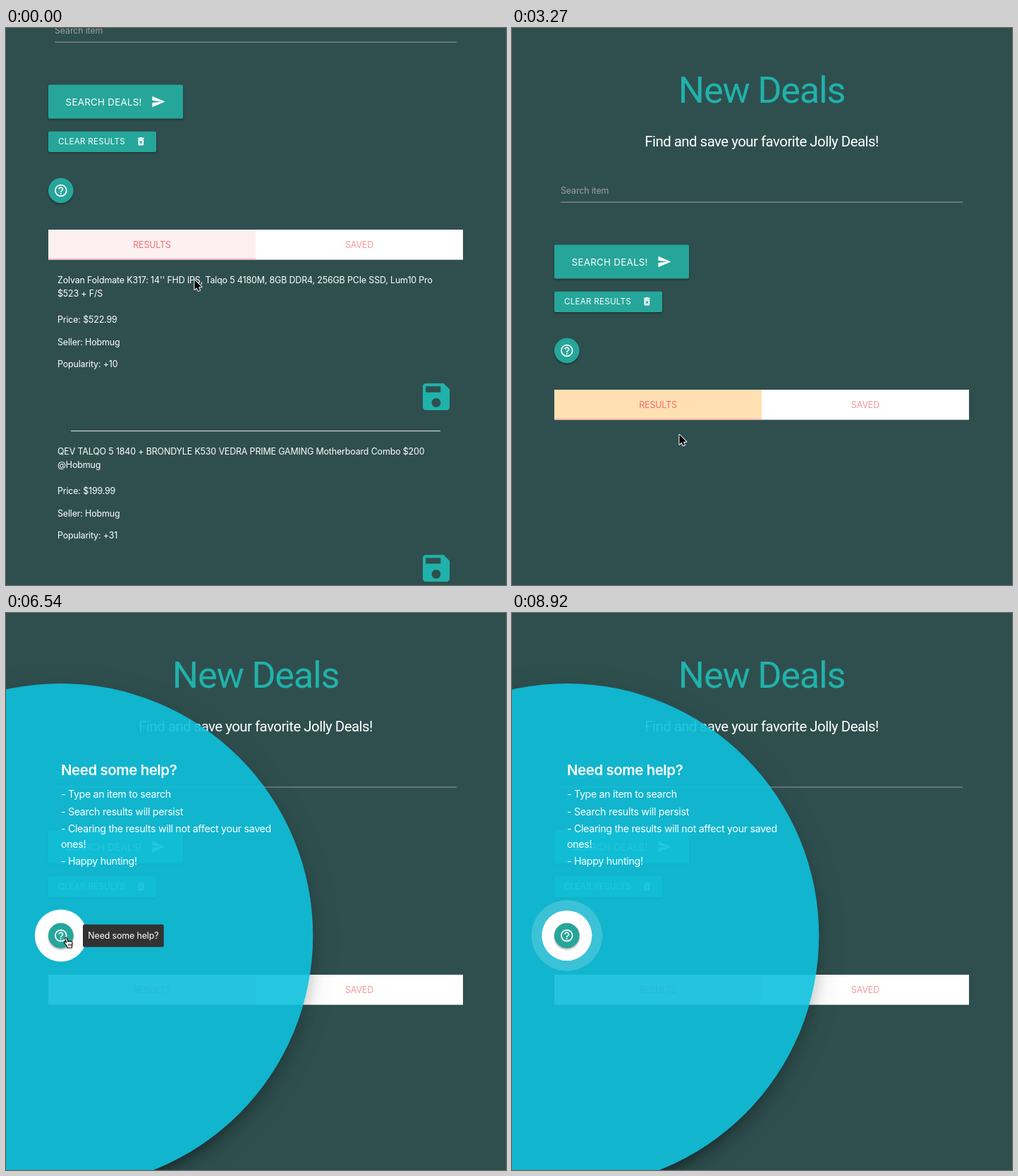
These frames come from a looping animation (709x790 px, 9.35 s). An HTML page with a canvas:

```html
<!DOCTYPE html>
<html lang="en">
<head>
<meta charset="utf-8">
<title>New Deals</title>
<style>
  html, body { margin: 0; width: 709px; height: 790px; overflow: hidden; background: #2f4f4f; }
  canvas { display: block; }
</style>
</head>
<body>
<canvas id="stage" width="709" height="790"></canvas>
<script>
const ctx = document.getElementById('stage').getContext('2d');
const LOOP = 9350, TICK = 148.6;
const BASE = 12.44;            // body text size
const SCROLL = 227;            // page offset while results are listed
const CLEARED = 1920, PICKED = 2660, OPENED = 5420;
const TEAL = '#26a69a', SEA = '#20b2aa', CORAL = '#ee6e73';
const FAB = { x: 77.8, y: 457.5 };

const ICONS = {
  send: 'M2 21L23 12 2 3v7l15 2-15 2z',
  trash: 'M6 19c0 1.1.9 2 2 2h8c1.1 0 2-.9 2-2V7H6v12zm2.46-7.12l1.41-1.41L12 12.59l2.12-2.12 1.41 1.41L13.41 14l2.12 2.12-1.41 1.41L12 15.41l-2.12 2.12-1.41-1.41L10.59 14zM15.5 4l-1-1h-5l-1 1H5v2h14V4z',
  help: 'M11 18h2v-2h-2zM12 6c-2.21 0-4 1.79-4 4h2c0-1.1.9-2 2-2s2 .9 2 2c0 2-3 1.75-3 5h2c0-2.25 3-2.5 3-5 0-2.21-1.79-4-4-4z',
  save: 'M17 3H5c-1.11 0-2 .9-2 2v14c0 1.1.89 2 2 2h14c1.1 0 2-.9 2-2V7l-4-4zm-5 16c-1.66 0-3-1.34-3-3s1.34-3 3-3 3 1.34 3 3-1.34 3-3 3zm3-10H5V5h10v4z',
  arrow: 'M.5 .5v13.6l3.1-2.9 2.1 4.7 2.3-1-2-4.6h4.3z',
  hand: 'M3 .5c-1 0-1.5.7-1.2 1.6l1.9 5.2-1.6-.8c-1.1-.5-2.2.4-1.5 1.3l3.7 4.6.9 2.6h6l.7-3.2c.5-1.7.3-4-.3-5.4-.4-.9-1.5-.9-1.8-.2-.3-.9-1.7-1-2-.2-.4-.8-1.7-.8-2 0l-1.3-4.5c-.3-.7-.9-1-1.5-1z'
};
for (const k in ICONS) ICONS[k] = new Path2D(ICONS[k]);

const DEALS = [
  { y: 357.5, title: ["Zolvan Foldmate K317: 14'' FHD IPS, Talqo 5 4180M, 8GB DDR4, 256GB PCIe SSD, Lum10 Pro", '$523 + F/S'], price: '$522.99', votes: '+10' },
  { y: 600.7, title: ['QEV TALQO 5 1840 + BRONDYLE K530 VEDRA PRIME GAMING Motherboard Combo $200', '@Hobmug'], price: '$199.99', votes: '+31' }
];

const HELP = [
  [257, '- Type an item to search'], [281.5, '- Search results will persist'],
  [306, '- Clearing the results will not affect your saved'], [327.5, 'ones!'],
  [352, '- Happy hunting!']
];

// label, box, time shown, time hidden
const TIPS = [
  ['All Search Results! Save The Best Deal!', 87, 240, 240, 600, 1130],
  ['All Search Results! Save The Best Deal!', 87, 467, 240, 2520, 2940],
  ['Need some help?', 109, 441.7, 114.7, 4380, 7700],
  ['Your Saved Deals!', 442, 468, 118.5, 7720, 8150]
];

// time, x, y, pointer
const PATH = [
  [0, 267, 357, 'arrow'], [250, 258, 345, 'arrow'], [440, 225, 318, 'hand'],
  [740, 180, 300, 'hand'], [800, 165, 270, 'arrow'], [1040, 129, 191, 'arrow'],
  [1330, 131, 178, 'arrow'], [1480, 131, 168, 'hand'], [1640, 131, 163, 'hand'],
  [2080, 131, 163, 'hand'], [2190, 135, 200, 'arrow'], [2480, 180, 516, 'hand'],
  [2660, 205, 535, 'hand'], [2960, 207, 537, 'hand'], [3100, 220, 570, 'arrow'],
  [3500, 260, 585, 'arrow'], [4150, 108, 480, 'arrow'], [4280, 90, 463, 'hand'],
  [4440, 82, 460, 'hand'], [7500, 82, 460, 'hand'], [7560, 115, 475, 'arrow'],
  [7700, 400, 525, 'hand'], [7880, 510, 540, 'hand'], [7960, 540, 575, 'arrow'],
  [8030, 562, 607, 'arrow'], [8330, 655, 730, 'arrow'], [8480, 700, 800, 'arrow']
];

const clamp = v => Math.min(1, Math.max(0, v));
const ease = v => { v = clamp(v); return v * v * (3 - 2 * v); };

function text(s, x, y, { size = BASE, color = '#fff', weight = 400, gap = -0.15, align = 'left', font = 'Inter' } = {}) {
  ctx.font = `${weight} ${size}px ${font}, sans-serif`;
  ctx.letterSpacing = gap + 'px';
  ctx.textAlign = align;
  ctx.fillStyle = color;
  ctx.fillText(s, x, y + size * 0.36);
}

function rect(x, y, w, h, color) {
  ctx.fillStyle = color;
  ctx.fillRect(x, y, w, h);
}

function disc(x, y, r, color) {
  ctx.fillStyle = color;
  ctx.beginPath();
  ctx.arc(x, y, r, 0, Math.PI * 2);
  ctx.fill();
}

function round(x, y, w, h, color) {
  ctx.fillStyle = color;
  ctx.beginPath();
  ctx.roundRect(x, y, w, h, 2);
  ctx.fill();
}

function icon(name, cx, cy, scale, color) {
  ctx.save();
  ctx.translate(cx - 12 * scale, cy - 12 * scale);
  ctx.scale(scale, scale);
  ctx.fillStyle = color;
  ctx.fill(ICONS[name]);
  ctx.restore();
}

function raised(draw) {
  ctx.save();
  ctx.shadowColor = 'rgba(0,0,0,.38)';
  ctx.shadowBlur = 3;
  ctx.shadowOffsetY = 1.6;
  draw();
  ctx.restore();
}

function fab() {
  const { x, y } = FAB;
  raised(() => disc(x, y, 17.8, TEAL));
  icon('help', x, y, 0.87, '#fff');
  ctx.strokeStyle = '#fff';
  ctx.lineWidth = 1.75;
  ctx.beginPath();
  ctx.arc(x, y, 7.85, 0, Math.PI * 2);
  ctx.stroke();
}

function tabs(t) {
  const active = t < CLEARED || t >= PICKED;
  const dim = 'rgba(238,110,115,.7)';
  rect(60, 513, 588, 42.7, '#fff');
  if (active) {
    rect(60, 513, 294, 42.7, t >= PICKED && t < OPENED ? '#ffe0b2' : '#fdf0f1');
    rect(60, 553.9, 294, 1.8, '#f6b2b5');
  }
  text('RESULTS', 207, 534.5, { color: active ? CORAL : dim, align: 'center' });
  text('SAVED', 501, 534.5, { color: dim, align: 'center' });
}

function page(t) {
  text('New Deals', 354, 87.5, { size: 52.3, color: SEA, gap: -1.25, align: 'center', font: 'Roboto' });
  text('Find and save your favorite Jolly Deals!', 354, 161, { size: 20.4, gap: -0.5, align: 'center', font: 'Roboto' });
  text('Search item', 69, 230.7, { color: '#9e9e9e' });
  rect(69, 246.5, 570, 1, '#9e9e9e');
  raised(() => round(60, 307.6, 191, 48, TEAL));
  text('SEARCH DEALS!', 84.6, 332, { size: 13.33, gap: 0.28 });
  icon('send', 216, 331.4, 0.86, '#fff');
  raised(() => round(60, 373.8, 153, 29.2, TEAL));
  text('CLEAR RESULTS', 74, 388.2, { size: 11.56, gap: 0.29 });
  icon('trash', 191.3, 387.8, 0.64, '#fff');
  fab();
  tabs(t);
}

function deal(d, last) {
  const x = 73, { y } = d;
  d.title.forEach((s, i) => text(s, x, y + i * 18.7));
  text('Price: ' + d.price, x, y + 56.3);
  text('Seller: Hobmug', x, y + 87.6);
  text('Popularity: ' + d.votes, x, y + 119);
  icon('save', 610, y + 165.5, 2.11, SEA);
  if (!last) rect(92, y + 213.5, 524, 1, '#e3e8e8');
}

function castShadow(r, dy, blur, alpha) {
  const far = 3000;
  ctx.shadowColor = `rgba(0,0,0,${alpha})`;
  ctx.shadowBlur = blur;
  ctx.shadowOffsetX = far;
  ctx.shadowOffsetY = dy;
  disc(FAB.x - far, FAB.y, Math.max(0, r), '#000');
}

function helpPanel(t) {
  const s = ease((t - OPENED) / 300);
  if (s <= 0) return;
  const { x, y } = FAB, r = 357.5 * s;

  ctx.save();
  ctx.beginPath();
  ctx.rect(0, 0, 709, 790);
  ctx.arc(x, y, r, 0, Math.PI * 2);
  ctx.clip('evenodd');
  castShadow(r, 18 * s, 18, 0.14);
  castShadow(r, 9 * s, 44, 0.12);
  castShadow(r - 18 * s, 27 * s, 9, 0.2);
  ctx.restore();

  disc(x, y, r, 'rgba(14,192,220,.9)');
  ctx.save();
  ctx.translate(x, y);
  ctx.scale(s, s);
  ctx.translate(-x, -y);
  text('Need some help?', 78, 222.5, { size: 20.4, weight: 600, gap: -0.4 });
  for (const [ly, s] of HELP) text(s, 78, ly, { size: 14.2, gap: -0.3 });
  ctx.restore();

  const beat = ease(((t - OPENED + 20) % 1050) / 500);
  if (beat < 1) disc(x, y, 35.6 * s * (1 + beat / 2), `rgba(255,255,255,${1 - beat})`);
  disc(x, y, 35.6 * s, '#fff');
  fab();
}

function tips(t) {
  for (const [label, x, y, w, from, to] of TIPS) {
    if (t < from || t >= to) continue;
    const k = clamp((t - from) / 250);
    ctx.globalAlpha = k;
    const top = y + (1 - k) * 4;
    round(x, top, w, 32, '#323232');
    text(label, x + w / 2, top + 16.2, { align: 'center' });
    ctx.globalAlpha = 1;
  }
}

function pointer(t) {
  const i = PATH.findIndex(p => p[0] > t);
  if (i < 0) return;
  const a = PATH[i - 1], b = PATH[i];
  const k = (t - a[0]) / (b[0] - a[0]);
  ctx.save();
  ctx.translate(a[1] + (b[1] - a[1]) * k, a[2] + (b[2] - a[2]) * k);
  const isHand = a[3] === 'hand', shape = ICONS[a[3]];
  ctx.lineJoin = 'round';
  ctx.lineWidth = isHand ? 1.1 : 2;
  ctx.strokeStyle = isHand ? '#000' : '#fff';
  ctx.fillStyle = isHand ? '#fff' : '#000';
  if (isHand) { ctx.fill(shape); ctx.stroke(shape); rect(6, 9, 0.8, 3.5, '#000'); rect(8, 9, 0.8, 3.5, '#000'); rect(10, 9, 0.8, 3.5, '#000'); }
  else { ctx.stroke(shape); ctx.fill(shape); }
  ctx.restore();
}

function draw(t) {
  rect(0, 0, 709, 790, '#2f4f4f');
  const listed = t < CLEARED;
  ctx.save();
  if (listed) ctx.translate(0, -SCROLL);
  page(t);
  ctx.restore();
  if (listed) DEALS.forEach((d, i) => deal(d, i === DEALS.length - 1));
  helpPanel(t);
  tips(t);
  pointer(t);
}

// The screen refreshes in steps and rests on the last one.
function frame() {
  const t = performance.now() % LOOP;
  draw(Math.min(60, Math.floor((t + 20) / TICK)) * TICK);
  requestAnimationFrame(frame);
}
frame();
</script>
</body>
</html>
```
